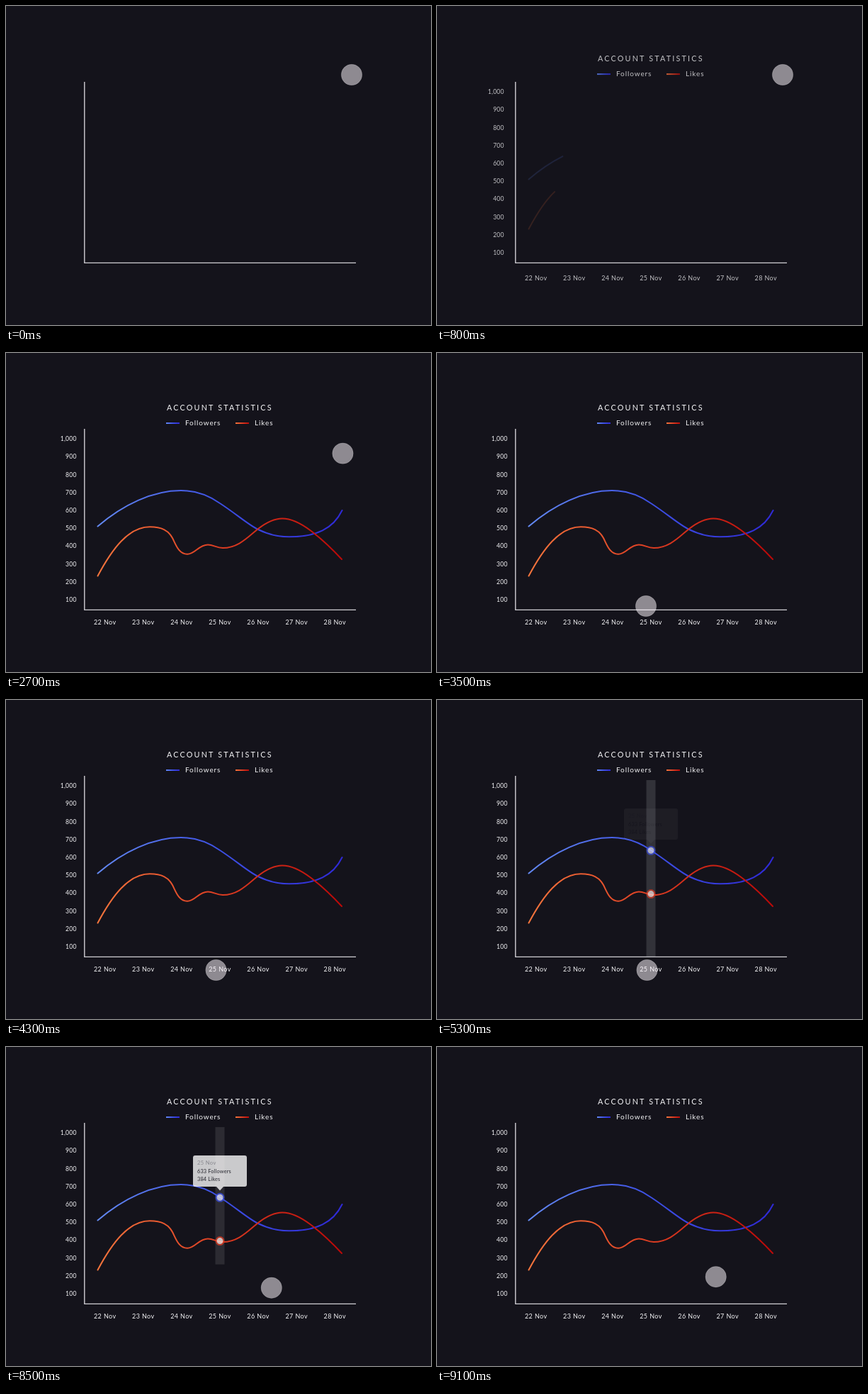
Write an HTML page that moves like this. It is 600x450 px and loops after 9.4 s.

```html
<!DOCTYPE html>
<html lang="en">
<head>
<meta charset="utf-8">
<title>Account statistics</title>
<style>
  html, body { margin: 0; width: 100%; height: 100%; overflow: hidden; background: #14131b; }
  svg { display: block; width: 600px; height: 450px; }
  text { font-family: Lato, "Open Sans", sans-serif; fill: #f4f4f6; }
  .title { font-size: 10.8px; letter-spacing: 2.17px; }
  .legend { font-size: 10px; letter-spacing: .9px; }
  .days { font-size: 9px; letter-spacing: .4px; text-anchor: middle; }
  .values { font-size: 8.6px; letter-spacing: .2px; text-anchor: end; }
  .tip text { font-size: 7.4px; letter-spacing: .15px; fill: #2c2c34; }
  .tip .date { font-size: 7.6px; letter-spacing: .35px; fill: #aaaab0; }
  .line { fill: none; stroke-width: 2; stroke-linecap: round; }
</style>
</head>
<body>
<svg viewBox="0 0 600 450">
  <defs>
    <linearGradient id="blue" gradientUnits="userSpaceOnUse" x1="129" x2="475" y1="0" y2="0">
      <stop stop-color="#6389f2"/><stop offset=".5" stop-color="#3d50e4"/><stop offset="1" stop-color="#2f29d6"/>
    </linearGradient>
    <linearGradient id="red" gradientUnits="userSpaceOnUse" x1="129" x2="475" y1="0" y2="0">
      <stop stop-color="#f4753d"/><stop offset=".5" stop-color="#dc3d22"/><stop offset="1" stop-color="#bb0808"/>
    </linearGradient>
    <linearGradient id="blueKey" href="#blue" x1="226" x2="245"/>
    <linearGradient id="redKey" href="#red" x1="324" x2="343"/>
  </defs>

  <rect id="strip" x="295.5" y="113" width="13" fill="#fff" fill-opacity=".13"/>
  <path d="M110.8 107V362.4H494" fill="none" stroke="#cfced3" stroke-width="1.4"/>

  <g id="header">
    <text class="title" x="227" y="81">ACCOUNT STATISTICS</text>
    <g class="legend">
      <path class="line" style="stroke-linecap:butt" stroke="url(#blueKey)" d="M226 99H245"/>
      <text x="253" y="102.3">Followers</text>
      <path class="line" style="stroke-linecap:butt" stroke="url(#redKey)" d="M324 99H343"/>
      <text x="351" y="102.3">Likes</text>
    </g>
  </g>
  <g id="values" class="values"></g>
  <g id="days" class="days"></g>

  <g id="curves">
    <path class="line" pathLength="1" stroke="url(#blue)" d="M129.5 244.5C165 214 207 194 247 194C268 194 285 200 302 212
      C325 227 343 243 356 249C369 255.5 384 259.3 400 259.3C438 259.3 462 248 474.5 222"/>
    <path class="line" pathLength="1" stroke="url(#red)" d="M129.5 314.5C150 276 173 245.3 203 245.3C220 245.3 229 250 235 261
      C240 271 244 283.8 256 283.8C267 283.8 272 270.5 285 270.5C293 270.5 297 275 306 275C328 275 341 260 356 248
      C367 239.5 378 233.5 390 233.5C405 233.5 418 241.5 430 250.5C446 262.5 461 277 474 291"/>
  </g>

  <g id="dots" stroke-width="2">
    <circle cx="302" cy="212.3" r="5.5" fill="#e2e4fb" stroke="#3b4ee2"/>
    <circle cx="302" cy="273.6" r="5.5" fill="#fbe9e6" stroke="#dc3a22"/>
  </g>
  <g id="tip" class="tip">
    <path d="M267 153H337a3 3 0 0 1 3 3V194a3 3 0 0 1-3 3H307L302 202.5L297 197H267a3 3 0 0 1-3-3V156a3 3 0 0 1 3-3Z" fill="#fff"/>
    <text class="date" x="270" y="165.6">25 Nov</text>
    <text x="270" y="178.3">633 Followers</text>
    <text x="270" y="189.3">384 Likes</text>
  </g>
  <circle id="cursor" r="14.7" fill="#fff8ff" fill-opacity=".52" stroke="#fff" stroke-opacity=".18"/>
</svg>
<script>
const LOOP = 9400, STEP = 100;
const $ = id => document.getElementById(id);

function addLabel(group, x, y, content) {
  const label = document.createElementNS("http://www.w3.org/2000/svg", "text");
  label.setAttribute("x", x);
  label.setAttribute("y", y);
  label.textContent = content;
  group.append(label);
}
for (let i = 0; i < 10; i++) addLabel($("values"), 99.6, 124.1 + 25.22 * i, (1000 - 100 * i).toLocaleString("en-US"));
for (let i = 0; i < 7; i++) addLabel($("days"), 139.7 + 54.1 * i, 382.6, `${22 + i} Nov`);

// Eased progress from 0 to 1 between two times.
function ease(t, start, end) {
  const p = Math.min(1, Math.max(0, (t - start) / (end - start)));
  return p < .5 ? 2 * p * p : 1 - 2 * (1 - p) ** 2;
}

// Cursor stops: time, x, y.
const stops = [
  [2400, 488, 97], [2900, 457, 193], [3200, 404, 292], [3500, 295, 357], [3800, 286, 397], [4300, 296.5, 381],
  [7450, 296.5, 381], [7900, 321, 372], [8400, 368.5, 345], [8500, 374.8, 339.7], [9100, 393.7, 324.2]
];
const isRest = i => i === 0 || i === 5 || i === 6 || i === stops.length - 1;

function slope(i, axis) {
  if (isRest(i)) return 0;
  const a = stops[i - 1], b = stops[i + 1];
  return (b[axis] - a[axis]) / (b[0] - a[0]);
}

function cursorAt(t, axis) {
  if (t <= stops[0][0]) return stops[0][axis];
  const next = stops.findIndex(s => s[0] >= t);
  if (next < 0) return stops.at(-1)[axis];
  const a = stops[next - 1], b = stops[next], span = b[0] - a[0], p = (t - a[0]) / span, q = 1 - p;
  return a[axis] * (1 + 2 * p) * q * q + b[axis] * p * p * (3 - 2 * p)
    + span * p * q * (slope(next - 1, axis) * q - slope(next, axis) * p);
}

function slideIn(id, progress, dx, dy) {
  const away = 1 - progress;
  $(id).setAttribute("opacity", progress);
  $(id).setAttribute("transform", `translate(${dx * away} ${dy * away})`);
}

function draw(t) {
  const labels = ease(t, 200, 1100);
  slideIn("header", labels, 0, -13);
  slideIn("values", labels, -22, 0);
  slideIn("days", labels, 0, 22);

  const drawn = ease(t, 500, 1600);
  $("curves").setAttribute("opacity", drawn);
  for (const curve of $("curves").children) {
    curve.setAttribute("stroke-dasharray", drawn < 1 ? `${drawn} 2` : "none");
  }

  const shown = 1 - ease(t, 8300, 8900);
  const strip = ease(t, 4400, 5200) * shown;
  $("strip").setAttribute("height", 249 * strip);
  $("strip").setAttribute("opacity", strip);
  $("dots").setAttribute("opacity", ease(t, 4900, 5550) * shown);
  $("tip").setAttribute("opacity", ease(t, 5200, 5900) * shown);

  $("cursor").setAttribute("cx", cursorAt(t, 1));
  $("cursor").setAttribute("cy", cursorAt(t, 2));
}

// The picture advances ten times a second.
function frame() {
  draw(Math.floor(performance.now() % LOOP / STEP) * STEP);
  requestAnimationFrame(frame);
}
frame();
</script>
</body>
</html>
```
